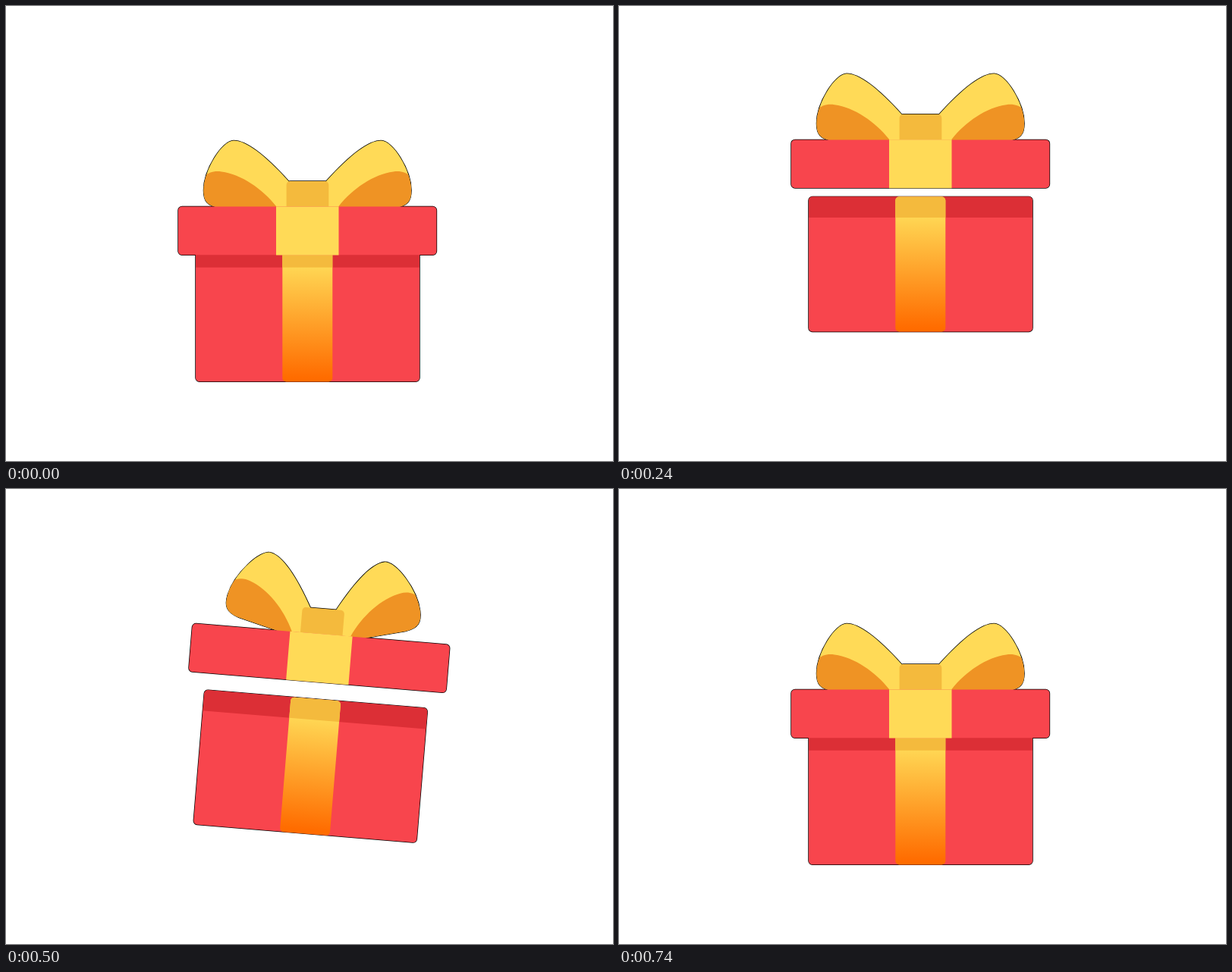
An HTML page with a canvas for the animation above (940 ms loop, 800x600 px).

```html
<!DOCTYPE html>
<html lang="en">
<head>
<meta charset="utf-8">
<title>Gift box</title>
<style>
  html, body { margin: 0; width: 100%; height: 100%; overflow: hidden; background: #fff; }
  canvas { display: block; }
</style>
</head>
<body>
<canvas id="stage" width="800" height="600"></canvas>
<script>
const ctx = document.getElementById('stage').getContext('2d');
const LOOP = 940, STEP = 20, REST = 740;
const PIVOT = { x: 397.5, y: 452 };
const BOW_ROOT = { x: 356, y: 264 };
const CENTER = 397.25;

const RED = '#f8454d', DARK_RED = '#dc2f36';
const YELLOW = '#ffda57', AMBER = '#f4ba3d', ORANGE = '#ef9324';

// Motion: every part eases out of its rest pose and back into it.
const progress = (t, from, to) => Math.min(1, Math.max(0, (t - from) / (to - from)));
const smooth = u => u * u * (3 - 2 * u);
const quickStart = u => u + u * u - u * u * u;
const softLanding = u => smooth(1 - (1 - u) ** 1.32);

const jump = t => 84 * (smooth(progress(t, 35, 328)) - softLanding(progress(t, 328, 740)));
const lidLift = t => 34 * (smooth(progress(t, 132, 310)) - smooth(progress(t, 490, 612)));
const tilt = t => 0.0885 * (quickStart(progress(t, 240, 560)) - smooth(progress(t, 560, 700)));
const bend = t => smooth(progress(t, 380, 560)) - smooth(progress(t, 580, 740));

// Left half of the bow; the right half is its mirror image.
const bowLoop = new Path2D(`M372.5 231 C340 195 316 177.5 300 177.5
  C285 177.5 260.5 216 260.5 243 C260.5 257 265 264 283 266 L373 270 L390 270 Z`);
const bowInside = new Path2D(`M259 227 C266 219 275 217 284 218.5
  C310 222 338 241 356 264 V290 H250 Z`);

function box(left, top, right, bottom, radius = 0) {
  const path = new Path2D();
  path.roundRect(left, top, right - left, bottom - top, radius);
  return path;
}

const body = box(250, 317.3, 545, 495.2, 5);
const bodyRibbon = box(364.3, 317.3, 430.3, 495.4, 5);
const lidShadow = box(240, 310, 560, 344.8);
const lid = box(227, 264.6, 567.4, 328.2, 5);
const lidRibbon = box(356, 264.4, 438.5, 328.4);
const knot = box(369.6, 231, 425.3, 272, 5);

const ribbonFill = ctx.createLinearGradient(0, 343, 0, 490);
ribbonFill.addColorStop(0, '#ffd754');
ribbonFill.addColorStop(1, '#ff6c00');

function paint(path, color) {
  ctx.fillStyle = color;
  ctx.fill(path);
}

function scoped(setup, draw) {
  ctx.save();
  setup();
  draw();
  ctx.restore();
}

const paintInside = (mask, path, color) =>
  scoped(() => ctx.clip(mask), () => paint(path, color));

function mirror() {
  ctx.translate(2 * CENTER, 0);
  ctx.scale(-1, 1);
}

// Swings the loop up around its root and stretches it a little.
function bendLoop(k) {
  ctx.translate(BOW_ROOT.x + 3 * k, BOW_ROOT.y);
  ctx.rotate(0.27 * k);
  ctx.scale(1 - 0.015 * k, 1 + 0.08 * k);
  ctx.translate(-BOW_ROOT.x, -BOW_ROOT.y);
}

function eachLoop(k, draw) {
  scoped(() => bendLoop(k), draw);
  scoped(() => { mirror(); bendLoop(k); }, draw);
}

function drawBody() {
  paint(body, RED);
  paintInside(body, lidShadow, DARK_RED);
  paint(bodyRibbon, ribbonFill);
  paintInside(bodyRibbon, lidShadow, AMBER);
}

function drawTop(k) {
  eachLoop(k, () => {
    paint(bowLoop, YELLOW);
    paintInside(bowLoop, bowInside, ORANGE);
  });
  paint(knot, AMBER);
  paint(lid, RED);
  paint(lidRibbon, YELLOW);
}

function outlineTop(k) {
  eachLoop(k, () => ctx.stroke(bowLoop));
  ctx.stroke(knot);
  ctx.stroke(lid);
}

function render(t) {
  const k = bend(t);
  const raiseLid = () => ctx.translate(0, -lidLift(t));
  const poseBox = () => {
    ctx.translate(PIVOT.x, PIVOT.y - jump(t));
    ctx.rotate(tilt(t));
    ctx.translate(-PIVOT.x, -PIVOT.y);
  };

  ctx.fillStyle = '#fff';
  ctx.fillRect(0, 0, 800, 600);
  scoped(poseBox, () => {
    // All outlines go underneath, so only the outer silhouette shows them.
    ctx.strokeStyle = '#000';
    ctx.lineWidth = 1.5;
    ctx.stroke(body);
    scoped(raiseLid, () => outlineTop(k));
    drawBody();
    scoped(raiseLid, () => drawTop(k));
  });
}

const start = performance.now();
function tick() {
  const t = (performance.now() - start) % LOOP;
  render(Math.min(REST, Math.floor(t / STEP) * STEP));
  requestAnimationFrame(tick);
}
tick();
</script>
</body>
</html>
```
